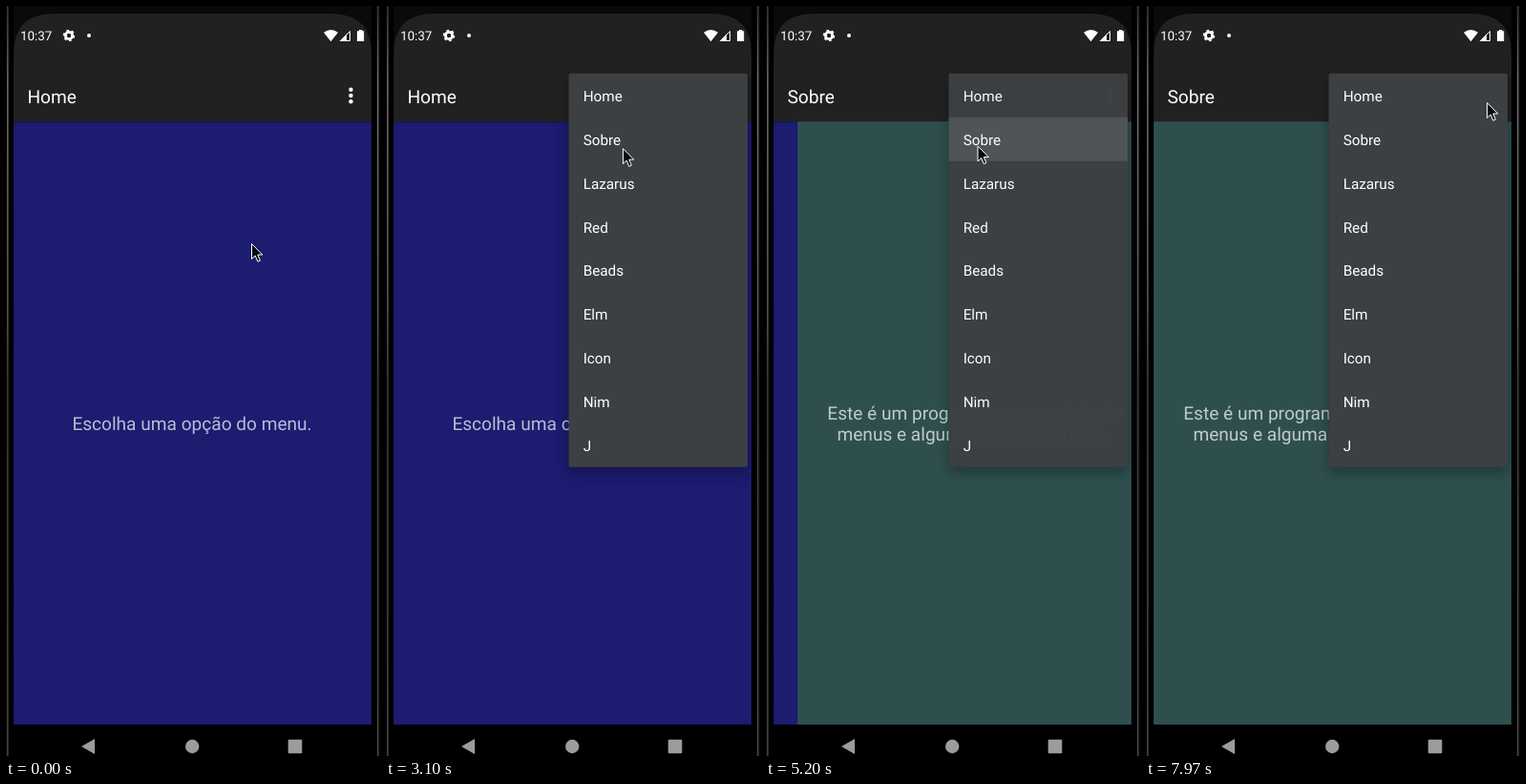
An HTML page for the animation above (8000 ms loop, 392 by 787 pixels).

```html
<!DOCTYPE html>
<html lang="pt">
<head>
<meta charset="utf-8">
<title>Menu</title>
<style>
html, body { margin: 0; height: 100%; overflow: hidden; background: #0a0a0a; }
svg { display: block; width: 100vw; height: 100vh; }
text { font-family: Roboto, sans-serif; fill: #fff; text-rendering: geometricPrecision; }
.title { font-size: 19.1px; }
.body { font-size: 19.1px; fill: rgba(255, 255, 255, .7); text-anchor: middle; }
.item { font-size: 15.28px; }
#panel { filter: drop-shadow(0 6px 7px rgba(0, 0, 0, .32)); }
</style>
</head>
<body>
<svg viewBox="0 0 392 787">
  <defs>
    <clipPath id="screen"><path d="M8 787V50Q8 8 50 8H341Q383 8 383 50V787Z"/></clipPath>
    <clipPath id="row"><rect x="191.5" y="116.7" width="187.5" height="46"/></clipPath>
    <linearGradient id="edge" x2="0" y2="1">
      <stop offset="0" stop-color="#333"/><stop offset=".1" stop-color="#6a6a6a"/>
      <stop offset=".4" stop-color="#555"/><stop offset=".5" stop-color="#3a3a3a"/>
      <stop offset="1" stop-color="#444"/>
    </linearGradient>
  </defs>

  <rect width="392" height="787" fill="#0a0a0a"/>
  <rect x="1" width="1.5" height="787" fill="url(#edge)"/>
  <rect x="389" width="1.5" height="787" fill="url(#edge)"/>
  <rect x="3" width="5" height="787"/>
  <rect x="383" width="5" height="787"/>

  <g clip-path="url(#screen)">
    <rect x="8" y="121" width="375" height="634" fill="#1c1c70"/>
    <rect x="8" y="121" width="375" height="1.5" opacity=".25"/>
    <text class="body" x="195" y="445">Escolha uma opção do menu.</text>
    <g id="about">
      <rect x="8" y="121" width="375" height="634" fill="#2f4f4f"/>
      <text class="body" x="195.3" y="434">Este é um programa para você testar</text>
      <text class="body" x="193" y="456.3">menus e alguma coisa de janelas.</text>
    </g>
    <rect x="8" y="8" width="375" height="113.3" fill="#212121"/>
    <text class="title" id="title" x="22.5" y="101.8"></text>
    <g fill="#fff">
      <text x="15" y="36" font-size="13.4">10:37</text>
      <g fill="none" stroke="#fff">
        <circle cx="66" cy="31" r="3.6" stroke-width="2.8"/>
        <circle cx="66" cy="31" r="5.3" stroke-width="1.8" pathLength="12" stroke-dasharray="1 1"/>
        <path d="M350.5 36.5L360.5 26.5V36.5Z"/>
      </g>
      <circle cx="87" cy="31" r="2"/>
      <path d="M333 27.8Q340.5 22.4 348 27.8L340.5 37.2Z"/>
      <path d="M349.5 37L357 29.5V37Z"/>
      <path d="M368 26.3H370V25H373.3V26.3H375.2V37H368Z"/>
      <circle cx="361.5" cy="87.7" r="2.2"/>
      <circle cx="361.5" cy="94" r="2.2"/>
      <circle cx="361.5" cy="100.2" r="2.2"/>
    </g>
    <circle id="dotsRipple" cx="362" cy="94.5" fill="#fff" opacity=".16"/>
    <rect x="8" y="754" width="375" height="33"/>
    <g fill="#9c9c9c">
      <path d="M79 777L93 769V785Z"/>
      <circle cx="195.2" cy="777" r="7.2"/>
      <rect x="295.7" y="769.7" width="14.6" height="14.6" rx="1"/>
    </g>
    <g id="menu">
      <rect id="panel" x="191.5" y="70.7" width="187.5" height="413" rx="2" fill="#3c4043"/>
      <circle id="rowRipple" cx="285" cy="140" fill="#fff" opacity=".11" clip-path="url(#row)"/>
    </g>
  </g>

  <circle id="press" fill="#d0202c"/>
  <path id="cursor" d="M.5 .5V16.5L4.2 13L6.8 19.2L9.4 18.1L6.8 12H11.8Z" fill="#0a0a0a" stroke="#fff"/>
</svg>
<script>
const LOOP = 8000;
const $ = id => document.getElementById(id);
const clamp = v => Math.min(1, Math.max(0, v));
const ramp = (t, from, to) => clamp((t - from) / (to - from));

// time, x, y of the pointer tip
const path = [
  [0, 257, 249], [29, 257, 249], [30, 258, 250], [450, 258, 250], [830, 365, 128],
  [970, 365, 128], [1100, 364.5, 99.5], [1300, 364, 97], [2470, 364, 97],
  [3100, 248, 149], [3270, 237, 202], [3400, 232, 212], [3930, 230, 97],
  [4170, 230, 97], [4500, 221.5, 146.5], [5640, 221.5, 146.5], [6080, 386, 82],
  [6230, 379, 92], [6470, 379, 92], [6570, 368, 96], [7960, 368, 96],
  [7970, 357, 101], [LOOP, 357, 101]
];
// press and release times
const clicks = [[1500, 1770], [4730, 5000], [6900, 7130]];

['Home', 'Sobre', 'Lazarus', 'Red', 'Beads', 'Elm', 'Icon', 'Nim', 'J'].forEach((name, i) => {
  const label = document.createElementNS('http://www.w3.org/2000/svg', 'text');
  label.setAttribute('class', 'item');
  label.setAttribute('x', 206.7);
  label.setAttribute('y', 100 + i * 45.87);
  label.textContent = name;
  $('menu').append(label);
});

function pointer(t) {
  const i = path.findIndex(p => p[0] > t);
  const [t0, x0, y0] = path[i - 1], [t1, x1, y1] = path[i];
  const u = ramp(t, t0, t1);
  const k = (u + u * u * (3 - 2 * u)) / 2;
  return [x0 + (x1 - x0) * k, y0 + (y1 - y0) * k];
}

function menuOpacity(t) {
  if (t < 2100) return 0;
  if (t < 5000) return ramp(t, 2070, 2165);
  if (t < 7570) return clamp((5370 - t) / 172);
  return 1;
}

function dotsRadius(t) {
  const start = t < 5000 ? 1770 : 7130;
  const end = t < 5000 ? 2170 : 7570;
  return t < start || t >= end ? 0 : 11 + 8 * ramp(t, start, start + 120);
}

function draw(t) {
  const [x, y] = pointer(t);
  $('cursor').setAttribute('transform', `translate(${x} ${y})`);

  const click = clicks.find(([down, up]) => t >= down && t < up + 130);
  const fade = click ? 1 - ramp(t, click[1], click[1] + 130) : 0;
  const press = $('press');
  press.setAttribute('cx', x + .5);
  press.setAttribute('cy', y + .5);
  press.setAttribute('r', 13 + 4.5 * fade);
  press.setAttribute('opacity', .75 * fade);

  $('title').textContent = t < 5000 ? 'Home' : 'Sobre';
  const slide = 375 * (1 - ramp(t, 5100, 5270)) ** 3;
  $('about').setAttribute('transform', `translate(${slide} 0)`);

  $('dotsRipple').setAttribute('r', dotsRadius(t));
  $('rowRipple').setAttribute('r', t < 4930 || t > 5400 ? 0 : 71 * (t - 4930) / 140);
  $('menu').setAttribute('opacity', menuOpacity(t));
}

const begin = performance.now();
function frame() {
  draw((performance.now() - begin) % LOOP);
  requestAnimationFrame(frame);
}
frame();
</script>
</body>
</html>
```
